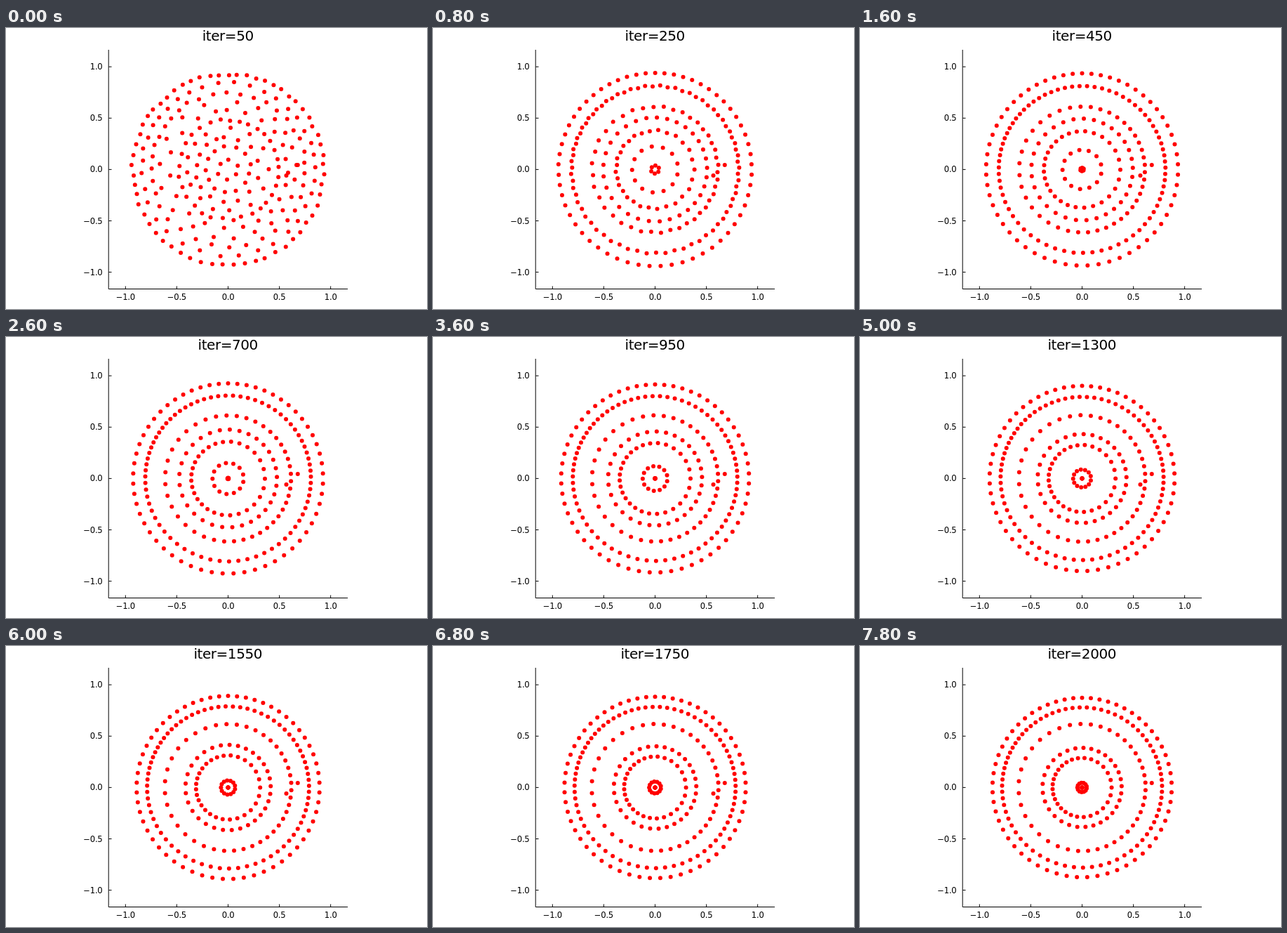
These frames come from a looping animation (600 px wide and 400 px high, 8000 ms). An HTML page:

```html
<!DOCTYPE html>
<html lang="en">
<head>
<meta charset="utf-8">
<style>
  html, body { margin: 0; width: 100%; height: 100%; overflow: hidden; background: #fff; }
  svg { display: block; width: 100vw; height: 100vh; }
  text { font: 11.6px "DejaVu Sans", sans-serif; letter-spacing: -0.25px; }
  #title { font-size: 20px; letter-spacing: -0.45px; }
</style>
</head>
<body>
<svg viewBox="0 0 600 400">
  <rect width="600" height="400" fill="#fff"/>
  <g id="axes" stroke="#000" fill="none"><path d="M146.2 31V371.5H487"/></g>
  <g id="labels"></g>
  <text id="title" x="316.2" y="18.3" text-anchor="middle"></text>
  <g id="dots" fill="#f00"></g>
</svg>
<script>
const CX = 316.5, CY = 201.4, UNIT = 146.2;
const STEP = 200, STEPS = 40, ITERS = 50;
const RAD = Math.PI / 180;
const NS = 'http://www.w3.org/2000/svg';
const $ = id => document.getElementById(id);

function add(parent, tag, attrs, text) {
  const el = document.createElementNS(NS, tag);
  for (const k in attrs) el.setAttribute(k, attrs[k]);
  if (text) el.textContent = text;
  parent.appendChild(el);
  return el;
}

for (let v = -1; v <= 1; v += 0.5) {
  const x = CX + v * UNIT, y = CY - v * UNIT;
  const label = v.toFixed(1).replace('-', '\u2212');
  add($('axes'), 'path', { d: `M${x} 371.5v-4M146.5 ${y}h4` });
  add($('labels'), 'text', { x, y: 387, 'text-anchor': 'middle' }, label);
  add($('labels'), 'text', { x: 137.5, y: y + 4, 'text-anchor': 'end' }, label);
}

let seed = 7;
function noise() {
  seed = seed * 16807 % 2147483647;
  return seed / 2147483647 * 2 - 1;
}

// count: dots in the ring; radius: its size by iteration
// start: radius before the dots gather; zigzag: half gap of two starting rows
// turn, bunch, phase, ripple: uneven spacing in degrees
const rings = [
  { count: 59, start: 136, radius: n => 139.5 - 0.0059 * n, bunch: 4.6, phase: 180 },
  { count: 72, start: 116.5, zigzag: 6.5, radius: n => 120.2 - 0.0031 * n,
    turn: 10.5, bunch: 7.7, phase: 194, ripple: 5 },
  { count: 41, start: 90.5, zigzag: 6.5, radius: n => 89.3 + 0.0006 * n,
    turn: -14, bunch: 13.4, phase: 70 },
  { count: 31, start: 71, radius: n => 77.6 - 0.0118 * n + 6e-7 * n * n,
    turn: -4.4, bunch: 6.4, phase: 90 },
  { count: 29, start: 52, zigzag: 6.5, radius: n => 58.1 - 0.008 * n,
    turn: 4, bunch: 12, phase: -90 },
  { count: 13, start: 32, radius: n => 28 * Math.exp((450 - n) / 1080), turn: -8 },
  { count: 6, start: 14, radius: n => 13 * Math.exp((50 - n) / 240), turn: 5 }
];

function makeDots(ring) {
  const { count, start, radius, zigzag = 0, turn = 0, bunch = 0, phase = 0, ripple = 0 } = ring;
  return Array.from({ length: count }, (_, i) => {
    const a = 360 * i / count;
    return {
      radius,
      angle: a + turn + bunch * Math.sin((a + phase) * RAD) + ripple * Math.sin(2 * a * RAD),
      shift: start - radius(ITERS) + (i % 2 ? zigzag : -zigzag) + 1.8 * noise(),
      sway: 100 / start * noise(),
      el: add($('dots'), 'circle', { r: 3 })
    };
  });
}
const dots = rings.flatMap(makeDots);

// Two dots stay off the rings; the second is absorbed late.
add($('dots'), 'circle', { r: 3, cx: 415.8, cy: 195 });
const stray = add($('dots'), 'circle', { r: 3, cx: 399.5, cy: 210 });

function draw(ms) {
  const iter = ITERS * (Math.floor(ms / STEP) % STEPS + 1);
  const scatter = Math.exp((ITERS - iter) / 90);
  for (const d of dots) {
    const r = d.radius(iter) + d.shift * scatter;
    const a = (d.angle + d.sway * scatter) * RAD;
    d.el.setAttribute('cx', (CX + r * Math.sin(a)).toFixed(2));
    d.el.setAttribute('cy', (CY - r * Math.cos(a)).toFixed(2));
  }
  stray.setAttribute('visibility', iter < 1800 ? 'visible' : 'hidden');
  $('title').textContent = 'iter=' + iter;
}

const begin = performance.now();
function tick() {
  draw(performance.now() - begin);
  requestAnimationFrame(tick);
}
tick();
</script>
</body>
</html>
```
